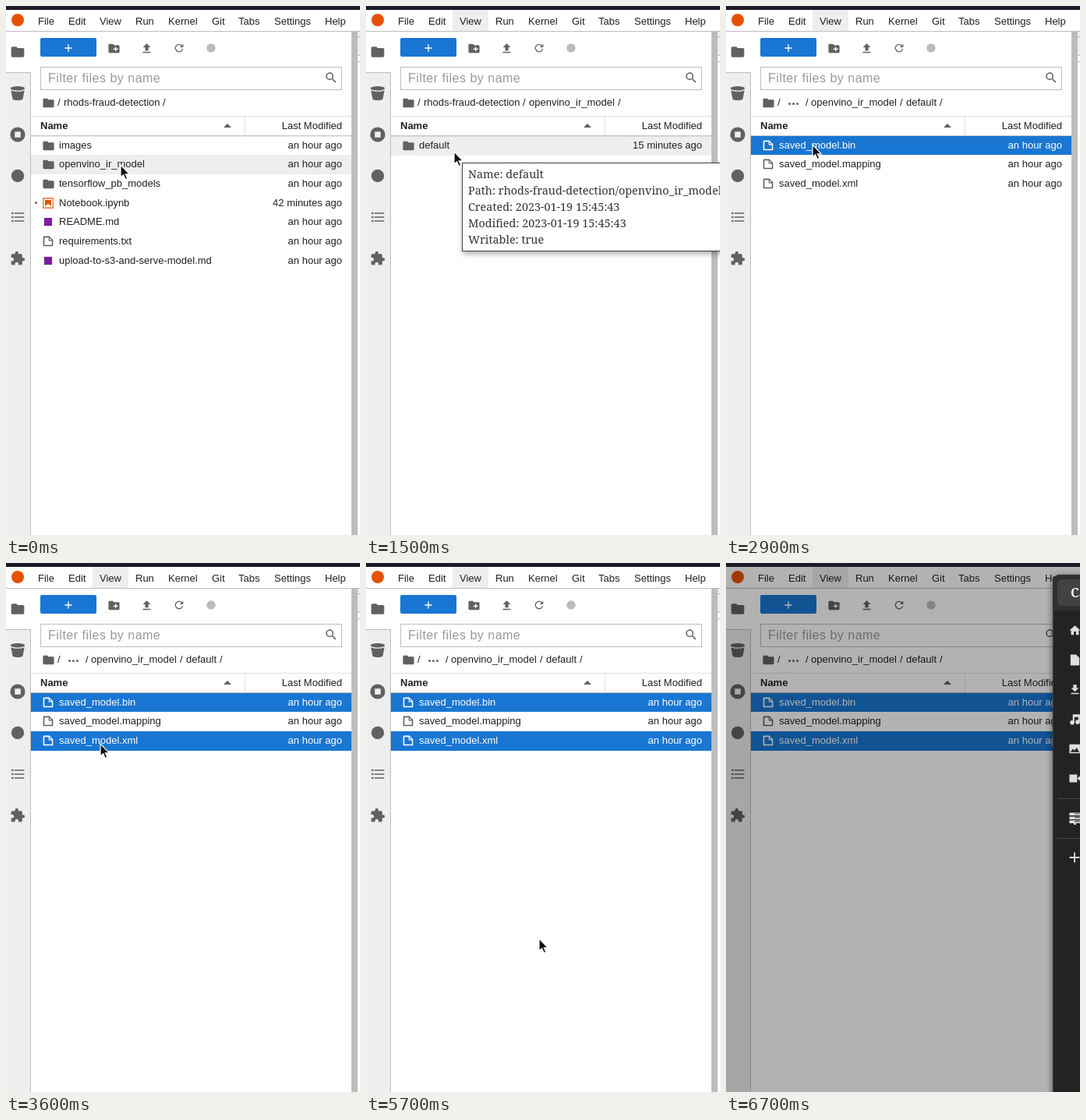
Write an HTML page that moves like this. It is 454 px wide and 679 px high and loops after 8000 ms.

```html
<!DOCTYPE html>
<html lang="en">
<head>
<meta charset="utf-8">
<title>File browser</title>
<style>
html, body { margin: 0; width: 100%; height: 100%; overflow: hidden; background: #fff; }
#stage { position: relative; width: 454px; height: 679px; overflow: hidden;
  font: 13px/16px "Liberation Sans", Arial, sans-serif; color: #212121; }
#stage div, #stage svg { position: absolute; }
.t { white-space: pre; }
.serif { font-family: "Noto Serif", serif; color: #333; }
.group { left: 0; top: 0; width: 454px; height: 679px; }
.sel { left: 32px; width: 411px; background: #1976d2; }
.white { color: #fff; }
#hover { left: 32px; width: 411px; height: 25px; background: #eee; }
#panel { left: 122px; top: 232px; width: 322px; height: 470px; background: #fff;
  border: 1px solid #bdbdbd; box-shadow: 0 1px 6px rgba(0,0,0,.3); }
#itemHover { left: 123px; width: 322px; height: 24px; background: #eee; }
#tipBox { left: 123px; top: 201px; width: 360px; height: 112px; background: #fff;
  border: 1px solid #444; box-shadow: 1px 3px 7px rgba(0,0,0,.35); }
.ripple { left: 94px; top: 205px; width: 56px; height: 56px; border-radius: 50%; background: #303236; }
#dim { left: 0; top: 5px; width: 454px; height: 674px; background: #000; }
#dialog { left: 419px; top: 15px; width: 600px; height: 700px; background: #232323;
  border-radius: 9px 9px 0 0; overflow: hidden; transform-origin: 50% 50%;
  box-shadow: 0 0 0 1px #3c3c3c inset, 0 2px 9px rgba(0,0,0,.6); }
</style>
</head>
<body>
<div id="stage"></div>
<script>
const GREY = '#616161', LINE = '#bdbdbd', INK = '#212121';
const LOOP = 8000;

// name: [viewBox size, markup]
const icons = {
  folder: [24, '<path d="M10 4H4c-1.1 0-2 .9-2 2v12c0 1.1.9 2 2 2h16c1.1 0 2-.9 2-2V8c0-1.1-.9-2-2-2h-8z"/>'],
  newFolder: [24, '<path d="M20 6h-8l-2-2H4c-1.1 0-2 .9-2 2v12c0 1.1.9 2 2 2h16c1.1 0 2-.9 2-2V8c0-1.1-.9-2-2-2zm-1 8h-3v3h-2v-3h-3v-2h3V9h2v3h3z"/>'],
  file: [22, '<path d="M19.3 8.2l-5.5-5.5c-.3-.3-.7-.5-1.2-.5H3.9c-.8.1-1.6.9-1.6 1.8v14.1c0 .9.7 1.6 1.6 1.6h14.2c.9 0 1.6-.7 1.6-1.6V9.4c.1-.5-.1-.9-.4-1.2zm-5.8-3.3l3.4 3.6h-3.4zm3.9 12.7H4.7c-.1 0-.2 0-.2-.2V4.7c0-.2.1-.3.2-.3h7.2v4.4s0 .8.3 1.1c.3.3 1.1.3 1.1.3h4.3v7.2s-.1.2-.2.2z"/>'],
  notebook: [22, '<path d="M18.7 3.3v15.4H3.3V3.3zm1.5-1.5H1.8v18.4h18.4z" fill-rule="evenodd"/><path d="M16.5 16.5l-5.4-4.3-5.6 4.3v-11h11z"/>'],
  square: [22, '<path d="M4 4h14v14H4z"/>'],
  dot: [22, '<circle cx="11" cy="11" r="9"/>'],
  stop: [24, '<path d="M6 6h12v12H6z"/>'],
  plus: [24, '<path d="M19 13h-6v6h-2v-6H5v-2h6V5h2v6h6z"/>'],
  upload: [24, '<path d="M5 20h14v-2H5zM5 10h4v6h6v-6h4l-7-7z"/>'],
  download: [24, '<path d="M19 9h-4V3H9v6H5l7 7zM5 18v2h14v-2z"/>'],
  refresh: [18, '<path d="M9 13.5a4.5 4.5 0 1 1 3.17-7.67L10 8h5V3l-1.76 1.76A6 6 0 1 0 14.9 10h-1.52A4.5 4.5 0 0 1 9 13.5z"/>'],
  search: [24, '<path d="M15.5 14h-.8l-.3-.3a6.5 6.5 0 1 0-.7.7l.3.3v.8l5 5 1.5-1.5zm-6 0a4.5 4.5 0 1 1 0-9 4.5 4.5 0 0 1 0 9z"/>'],
  edit: [24, '<path d="M3 17.25V21h3.75L17.8 9.94l-3.75-3.75zM20.7 7.04c.4-.4.4-1 0-1.4l-2.3-2.35c-.4-.4-1-.4-1.4 0l-1.85 1.83 3.75 3.75z"/>'],
  close: [24, '<path d="M5 5l14 14M19 5L5 19" stroke="currentColor" stroke-width="2"/>'],
  cut: [24, '<g fill="none" stroke="currentColor" stroke-width="2"><circle cx="6" cy="6" r="3"/><circle cx="6" cy="18" r="3"/></g><path d="M8 6.5L22 20v1h-3L7 9zM13 9l6-6h3v1l-7 7zM7 15l4-4 2 2-5 5z"/>'],
  copy: [24, '<path d="M16 1H4c-1.1 0-2 .9-2 2v14h2V3h12zm3 4H8c-1.1 0-2 .9-2 2v14c0 1.1.9 2 2 2h11c1.1 0 2-.9 2-2V7c0-1.1-.9-2-2-2zm0 16H8V7h11z"/>'],
  paste: [24, '<path d="M19 2h-4.2a3 3 0 0 0-5.6 0H5c-1.1 0-2 .9-2 2v16c0 1.1.9 2 2 2h14c1.1 0 2-.9 2-2V4c0-1.1-.9-2-2-2zm0 18H5V4h2v3h10V4h2z"/>'],
  text: [24, '<path d="M2 3h20v2H2zM2 8h14v2H2zM2 13h20v2H2zM2 18h14v2H2z"/>'],
  list: [24, '<path d="M7 5h15v2H7zM7 11h15v2H7zM7 17h15v2H7z"/><circle cx="4" cy="6" r="1.6"/><circle cx="4" cy="12" r="1.6"/><circle cx="4" cy="18" r="1.6"/>'],
  bucket: [24, '<ellipse cx="12" cy="4.5" rx="11" ry="3.2"/><path d="M1.6 7.5c5 2.4 15.800 2.400 20.800 0l-2.600 13.500c-3 2.500-12.600 2.500-15.600 0z"/>'],
  running: [24, '<circle cx="12" cy="12" r="11.500"/><path d="M7.500 7.500h9v9h-9z" fill="#eee"/>'],
  puzzle: [24, '<path d="M20.500 11H19V7c0-1.100-.9-2-2-2h-4V3.500a2.500 2.500 0 0 0-5 0V5H4c-1.100 0-2 .9-2 2v3.800h1.500a2.700 2.700 0 0 1 0 5.400H2V20c0 1.100.9 2 2 2h3.800v-1.500a2.700 2.700 0 0 1 5.400 0V22H17c1.100 0 2-.9 2-2v-4h1.500a2.500 2.500 0 0 0 0-5z"/>'],
  home: [24, '<path d="M10 20v-6h4v6h5v-8h3L12 3 2 12h3v8z"/>'],
  doc: [24, '<path d="M4 2h10l6 6v14H4z"/>'],
  music: [24, '<path d="M8 3h13v14h-3V8h-7v10H8z"/><circle cx="7" cy="18" r="4"/><circle cx="17" cy="17" r="4"/>'],
  image: [24, '<path d="M2 4h20v16H2zM4 18h16l-5-8-4 5-3-3z" fill-rule="evenodd"/>'],
  video: [24, '<path d="M2 5h14v14H2zM16 12l7-6v12z"/>'],
  server: [24, '<path d="M2 2h20v5H2zM2 9h20v5H2zM2 16h20v5H2zM10 21h4v3h-4z"/><path d="M12 4h8M12 11h8M12 18h8" stroke="#232323" stroke-width="2" stroke-dasharray="2 1"/>'],
};

const icon = (name, x, y, size, color = GREY) => {
  const [box, body] = icons[name];
  return `<svg style="left:${x - size / 2}px;top:${y - size / 2}px;color:${color}" width="${size}" height="${size}" viewBox="0 0 ${box} ${box}" fill="currentColor">${body}</svg>`;
};
const text = (x, y, s, style = '') => `<div class="t" style="left:${x}px;top:${y - 8}px;${style}">${s}</div>`;
const right = (edge, y, s) => `<div class="t" style="right:${454 - edge}px;top:${y - 8}px">${s}</div>`;
const rect = (x, y, w, h, color, style = '') =>
  `<div style="left:${x}px;top:${y}px;width:${w}px;height:${h}px;background:${color};${style}"></div>`;
const group = (id, body) => `<div class="group" id="${id}">${body}</div>`;

// Fixed parts of the window
const menuBar = [['File', 41], ['Edit', 80], ['View', 120], ['Run', 166], ['Kernel', 208],
  ['Git', 264], ['Tabs', 298], ['Settings', 344], ['Help', 409]];
const sideIcons = ['folder', 'bucket', 'running', 'dot', 'list', 'puzzle'];
const frame =
  rect(0, 0, 454, 5, '#1c1b29') +
  rect(0, 32, 454, 1, LINE) +
  `<div id="viewTab" style="left:111px;top:5px;width:46px;height:27px;background:#eee"></div>` +
  rect(7, 10, 16, 16, '#e65100', 'border-radius:50%') +
  menuBar.map(([s, x]) => text(x, 20, s)).join('') +
  rect(0, 85, 31, 594, '#eee') + rect(0, 85, 32, 1, LINE) + rect(31, 85, 1, 594, LINE) +
  sideIcons.map((n, i) => icon(n, 15, 59 + 53 * i, 20)).join('') +
  rect(443, 33, 8, 646, LINE) +
  rect(451, 33, 3, 30, '#eee') + rect(451, 39, 3, 1, LINE) + rect(451, 63, 3, 1, LINE) + rect(451, 71, 3, 1, LINE) +
  rect(44, 41, 72, 24, '#1976d2', 'border-radius:2px') +
  icon('plus', 80, 53.5, 16, '#fff') +
  icon('newFolder', 138, 54, 17) + icon('upload', 180, 54, 17) +
  icon('refresh', 222, 54, 16) + icon('dot', 263, 54, 14, LINE) +
  rect(44, 78, 385, 28, '#fff', `border:1px solid ${LINE}`) +
  text(54, 93, 'Filter files by name', 'font-size:16px;letter-spacing:.5px;color:#9a9a9a') +
  icon('search', 417, 92, 18) +
  icon('folder', 54, 124, 17) + text(66, 124, '/') +
  rect(32, 141, 411, 1, '#e0e0e0') + rect(306, 142, 1, 24, '#e0e0e0') +
  rect(32, 166, 411, 1, '#c4c4c4', 'box-shadow:0 1px 1px rgba(0,0,0,.08)') +
  text(44, 154, 'Name', 'font-weight:bold') + right(431, 154, 'Last Modified') +
  `<svg style="left:279px;top:151px" width="10" height="5"><path d="M0 5l5-5 5 5z" fill="${GREY}"/></svg>`;

// File lists
const rowTop = i => Math.round(166.6 + 24.67 * i);
const rowBody = (i, [kind, name, time = 'an hour ago', tint = GREY], color) => {
  const y = rowTop(i) + 12;
  return icon(kind, 54, y, kind === 'folder' ? 17 : 16, color || tint) + text(68, y, name) + right(431, y, time);
};
const list = files => files.map((f, i) => rowBody(i, f)).join('');
const picked = (id, i, f) => group(id,
  `<div class="sel" style="top:${rowTop(i)}px;height:${rowTop(i + 1) - rowTop(i)}px"></div>` +
  `<div class="group white">${rowBody(i, f, '#fff')}</div>`);
const crumbs = parts => parts.map(([x, s]) => text(x, 124, s)).join('');

const root = [
  ['folder', 'images'], ['folder', 'openvino_ir_model'], ['folder', 'tensorflow_pb_models'],
  ['notebook', 'Notebook.ipynb', '42 minutes ago', '#e65100'],
  ['square', 'README.md', undefined, '#7b1fa2'], ['file', 'requirements.txt'],
  ['square', 'upload-to-s3-and-serve-model.md', undefined, '#7b1fa2']];
const model = [['folder', 'default', '15 minutes ago']];
const saved = ['bin', 'mapping', 'xml'].map(e => ['file', 'saved_model.' + e]);

const views =
  group('viewRoot', crumbs([[74, 'rhods-fraud-detection'], [201, '/']]) + list(root) +
    rect(37, 251, 3, 3, GREY, 'border-radius:50%') + picked('pickModel', 1, root[1])) +
  group('viewModel', crumbs([[74, 'rhods-fraud-detection'], [201, '/'], [209, 'openvino_ir_model'], [323, '/']]) +
    list(model) + picked('pickDefault', 0, model[0])) +
  group('viewSaved', [80, 85, 90].map(x => rect(x - .5, 123.5, 3, 3, GREY, 'border-radius:50%')).join('') +
    crumbs([[102, '/'], [109, 'openvino_ir_model'], [223, '/'], [231, 'default'], [274, '/']]) +
    list(saved) + picked('pickBin', 0, saved[0]) + picked('pickXml', 2, saved[2]));

const tip = group('tip', '<div id="tipBox"></div>' +
  ['Name: default', 'Path: rhods-fraud-detection/openvino_ir_model/default', 'Created: 2023-01-19 15:45:43',
    'Modified: 2023-01-19 15:45:43', 'Writable: true']
    .map((s, i) => `<div class="t serif" style="left:131px;top:${205 + 21 * i}px;font-size:14.4px;line-height:21px">${s}</div>`).join(''));

// Context menu: icon, label, shortcut; null is a separator
const items = [
  ['folder', '<u>O</u>pen'], ['', 'Open With', '>'], ['plus', '<u>O</u>pen in New Browser Tab'], null,
  ['dot', 'Git', '>'], ['edit', '<u>R</u>ename', 'F2'], ['close', '<u>D</u>elete', 'Del'], ['cut', 'Cut', 'Ctrl+X'],
  ['copy', '<u>C</u>opy', 'Ctrl+C'], ['copy', 'Duplicate', 'Ctrl+D'], ['download', 'Download'], null,
  ['stop', 'Shut Down Kernel'], null,
  ['copy', '<u>C</u>opy Download Link'], ['copy', 'Copy Path'], null,
  ['newFolder', 'New Folder'], ['text', 'New File'], ['square', 'New Markdown File'], ['paste', '<u>P</u>aste', 'Ctrl+V']];
let itemY = 249;
const menuBody = items.map(item => {
  if (!item) {
    itemY += 9;
    return rect(123, itemY - 17, 322, 1, '#e0e0e0');
  }
  const [kind, label, key] = item, y = itemY;
  itemY += 24;
  return (kind ? icon(kind, 138, y, 16, kind === 'square' ? '#7b1fa2' : GREY) : '') + text(152, y, label) +
    (key === '>' ? `<svg style="left:430px;top:${y - 2}px" width="4" height="6"><path d="M0 0l4 3-4 3z" fill="${GREY}"/></svg>`
      : key ? right(423, y, key) : '');
}).join('');
const menu = group('menu', '<div id="panel"></div><div id="itemHover"></div>' + menuBody);

const places = [['home', 86], ['doc', 124], ['download', 162], ['music', 200], ['image', 238], ['video', 276],
  ['server', 327], ['plus', 378]];
const dialog = `<div id="dialog">${rect(0, 0, 600, 46, '#303030')}${rect(6, 6, 90, 34, '#434343', 'border-radius:6px')}` +
  `<div class="t serif" style="left:23px;top:12px;font-size:16px;line-height:22px;font-weight:bold;color:#fff">Cancel</div>` +
  places.map(([n, y]) => icon(n, 28, y - 15, n === 'plus' ? 22 : 17, '#dedede')).join('') +
  rect(6, 287, 200, 1, '#484848') + rect(6, 338, 200, 1, '#484848') + '</div>';

const cursor = '<svg id="cursor" style="left:-2px;top:-2px" width="18" height="24" viewBox="-2 -2 18 24">' +
  '<path d="M0 0v16l3.600-3.200 2.500 5.700 2.700-1.200-2.500-5.500h5z" fill="#111" stroke="#fff" stroke-width="1.200"/></svg>';

document.getElementById('stage').innerHTML = '<div id="hover"></div>' + frame + views + tip +
  [1, 2, 3].map(n => `<div class="ripple" id="ripple${n}"></div>`).join('') +
  menu + cursor + '<div id="dim"></div>' + dialog;

// Motion: [ms, declarations] lists become stepped CSS keyframes
let css = '';
function track(id, frames) {
  const body = frames.map(([ms, rule]) => `${ms / LOOP * 100}%{${rule}}`).join('');
  css += `@keyframes ${id}{${body}}#${id}{animation:${id} ${LOOP}ms step-end infinite}`;
}
function show(id, from, to = LOOP) {
  const frames = [[from, 'opacity:1']];
  if (from > 0) frames.unshift([0, 'opacity:0']);
  if (to < LOOP) frames.push([to, 'opacity:0']);
  track(id, frames);
}

show('viewTab', 200);
show('viewRoot', 0, 500);
show('pickModel', 200);
show('viewModel', 500, 1900);
show('pickDefault', 1700);
show('tip', 1500, 1700);
show('viewSaved', 1900);
show('pickBin', 2600);
show('pickXml', 3600);
show('menu', 4500, 5700);

const bar = (ms, top) => [ms, top ? `opacity:1;top:${top}px` : 'opacity:0;top:0'];
track('hover', [bar(0, 191), bar(500), bar(900, 167), bar(3100, 191), bar(3200, 216), bar(3300), bar(3400, 216), bar(3600)]);
track('itemHover', [bar(0), bar(4800, 285), bar(4900, 342), bar(5000, 390), bar(5100, 438), bar(5200, 462)]);

const path = [
  [0, 147, 204], [800, 138, 200], [900, 121, 189], [1000, 113, 187],
  [2200, 112, 189], [2300, 111, 190], [2400, 111, 187], [2600, 111, 181],
  [2900, 111, 178], [3000, 112, 186], [3100, 114, 206], [3200, 117, 228], [3300, 120, 242], [3400, 121, 238], [3500, 121, 233],
  [3600, 121, 232], [4400, 122, 233], [4600, 126, 240],
  [4700, 135, 251], [4800, 152, 290], [4900, 176, 345], [5000, 199, 408], [5100, 215, 456], [5200, 222, 482],
  [6000, 262, 440], [6100, 326, 366], [6200, 396, 280], [6300, 470, 200]];
track('cursor', path.map(([ms, x, y]) => [ms, `transform:translate(${x}px,${y}px)`]));

// Pointer ripples: delay, duration, start scale, end scale, start opacity
[[0, 830, .25, 1.5, .7], [50, 1000, 0, 1.25, .7], [350, 1000, 0, 1, .3]].forEach(([delay, span, from, to, alpha], i) => {
  const frames = [[0, 'opacity:0;transform:scale(0)']];
  for (let ms = 3800; ms <= 5200; ms += 100) {
    const p = Math.min(1, (ms - 3800 - delay) / span);
    const o = p < 0 ? 0 : Math.sqrt(alpha) * (1 - p * p);
    frames.push([ms, `opacity:${o.toFixed(3)};transform:scale(${(from + (to - from) * Math.max(0, p)).toFixed(3)})`]);
  }
  track('ripple' + (i + 1), frames);
});

const opening = [6300, 6400, 6500, 6600, 6700];
track('dim', [[0, 'opacity:0'], ...opening.map((ms, i) => [ms, `opacity:${.06 * (i + 1)}`])]);
track('dialog', [[0, 'opacity:0;transform:scaleY(0)'],
  ...opening.map((ms, i) => [ms, `opacity:1;transform:scaleY(${1 - ((4 - i) / 5) ** 2})`])]);

document.head.appendChild(document.createElement('style')).textContent = css;
</script>
</body>
</html>
```
